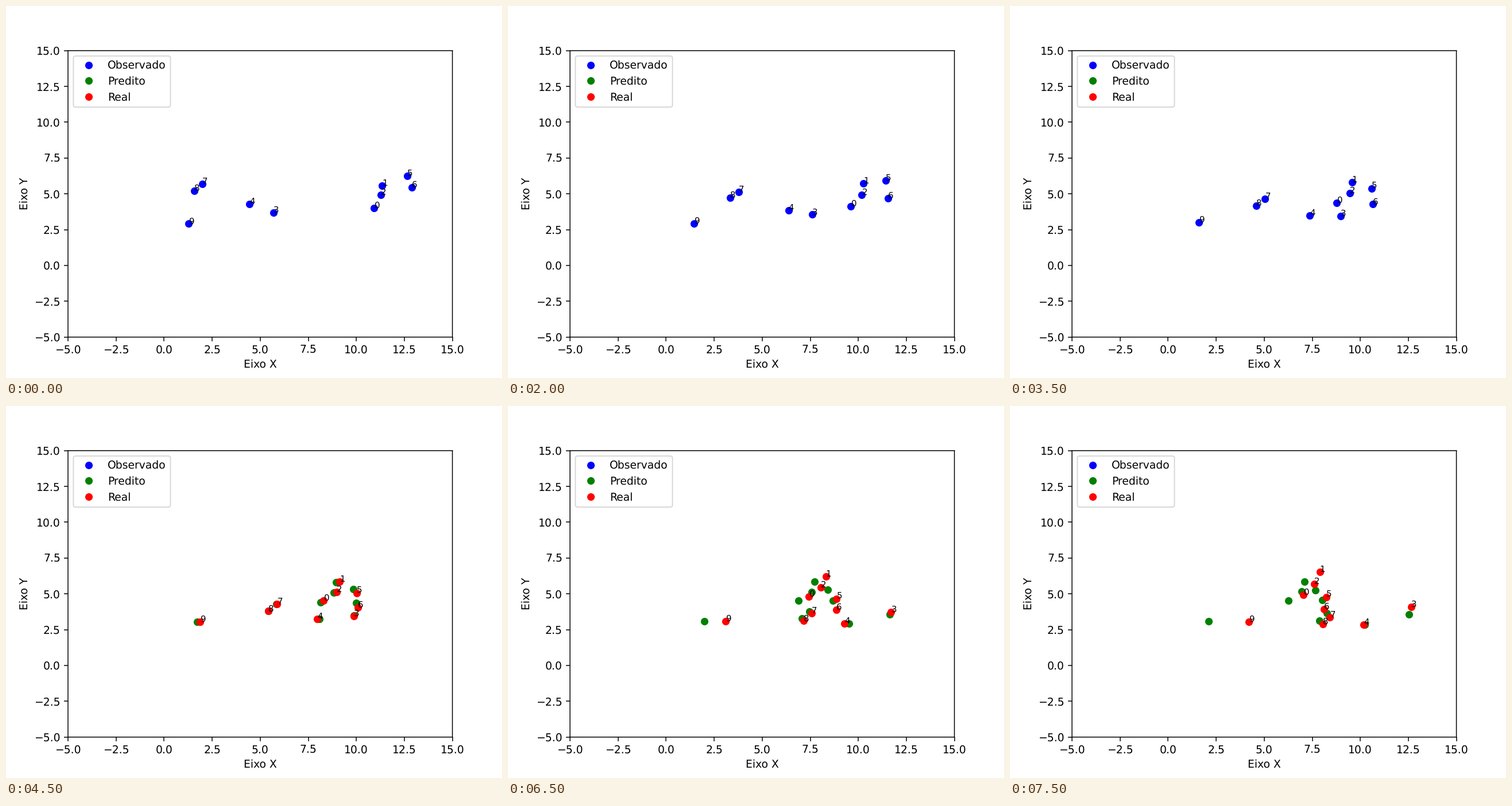
A matplotlib script that plays this animation: 864x648 px, repeating every 8 s.

```python
import numpy as np
import matplotlib.pyplot as plt
from matplotlib.animation import FuncAnimation

WIDTH, HEIGHT, DPI = 864, 648, 135
STEPS, INTERVAL = 16, 500
LAST_OBSERVED, LAST = 7, STEPS - 1

# Each walker follows a cubic through four key points, reached at these steps.
KEY_STEPS = [0, LAST_OBSERVED, 11, LAST]
WALKERS = np.array([
    [(10.92, 4.00), (8.78, 4.36), (7.84, 4.69), (7.05, 4.92)],
    [(11.34, 5.57), (9.57, 5.80), (8.72, 5.98), (7.89, 6.55)],
    [(11.27, 4.94), (9.45, 5.03), (8.52, 5.28), (7.60, 5.69)],
    [(5.70, 3.69), (8.97, 3.45), (10.79, 3.53), (12.65, 4.09)],
    [(4.45, 4.29), (7.37, 3.48), (8.58, 3.07), (10.17, 2.85)],
    [(12.65, 6.24), (10.58, 5.39), (9.46, 4.77), (8.24, 4.76)],
    [(12.90, 5.46), (10.66, 4.27), (9.50, 3.93), (8.12, 3.93)],
    [(1.98, 5.68), (5.05, 4.63), (6.72, 3.95), (8.42, 3.36)],
    [(1.57, 5.22), (4.60, 4.18), (6.28, 3.42), (8.04, 2.90)],
    [(1.28, 2.91), (1.61, 3.01), (2.35, 3.10), (4.20, 3.05)],
])
PREDICTED_ENDS = np.array([
    (6.26, 4.53), (7.09, 5.86), (6.94, 5.15), (12.53, 3.57), (10.22, 2.83),
    (7.67, 5.27), (8.03, 4.55), (8.27, 3.63), (7.88, 3.14), (2.11, 3.08),
])
CUBICS = np.polyfit(KEY_STEPS, WALKERS.transpose(1, 0, 2).reshape(4, -1), 3)


def real_positions(step):
    return (step ** np.arange(3, -1, -1) @ CUBICS).reshape(-1, 2)


def predicted_positions(step):
    """Steady sideways drift that levels off vertically."""
    start = real_positions(LAST_OBSERVED)
    u = (step - LAST_OBSERVED) / (LAST - LAST_OBSERVED)
    return start + (PREDICTED_ENDS - start) * [u, 1 - (1 - u) ** 1.5]


# Unhinted text and unsnapped paths keep sub-pixel sizes and positions.
plt.rcParams.update({"text.hinting": "none", "path.snap": False})

fig, ax = plt.subplots(figsize=(WIDTH / DPI, HEIGHT / DPI), dpi=DPI)
observed, predicted, real = [
    ax.scatter([], [], s=36, linewidths=1, color=color, label=label)
    for color, label in [("blue", "Observado"), ("green", "Predito"), ("red", "Real")]
]
ax.set(xlim=(-5, 15), ylim=(-5, 15), xlabel="Eixo X", ylabel="Eixo Y")
ax.legend(loc="upper left", scatteryoffsets=[0.5])
labels = [ax.text(0, 0, str(i), fontsize=8) for i in range(len(WALKERS))]


def update(step):
    points = real_positions(step)
    observing = step <= LAST_OBSERVED
    observed.set_offsets(points)
    real.set_offsets(points)
    predicted.set_offsets(predicted_positions(max(step, LAST_OBSERVED)))
    observed.set_visible(observing)
    predicted.set_visible(not observing)
    real.set_visible(not observing)
    for label, point in zip(labels, points):
        label.set_position(point)
    return [observed, predicted, real, *labels]


anim = FuncAnimation(fig, update, frames=STEPS, interval=INTERVAL,
                     repeat=True, repeat_delay=0, blit=False)
plt.show()
```
